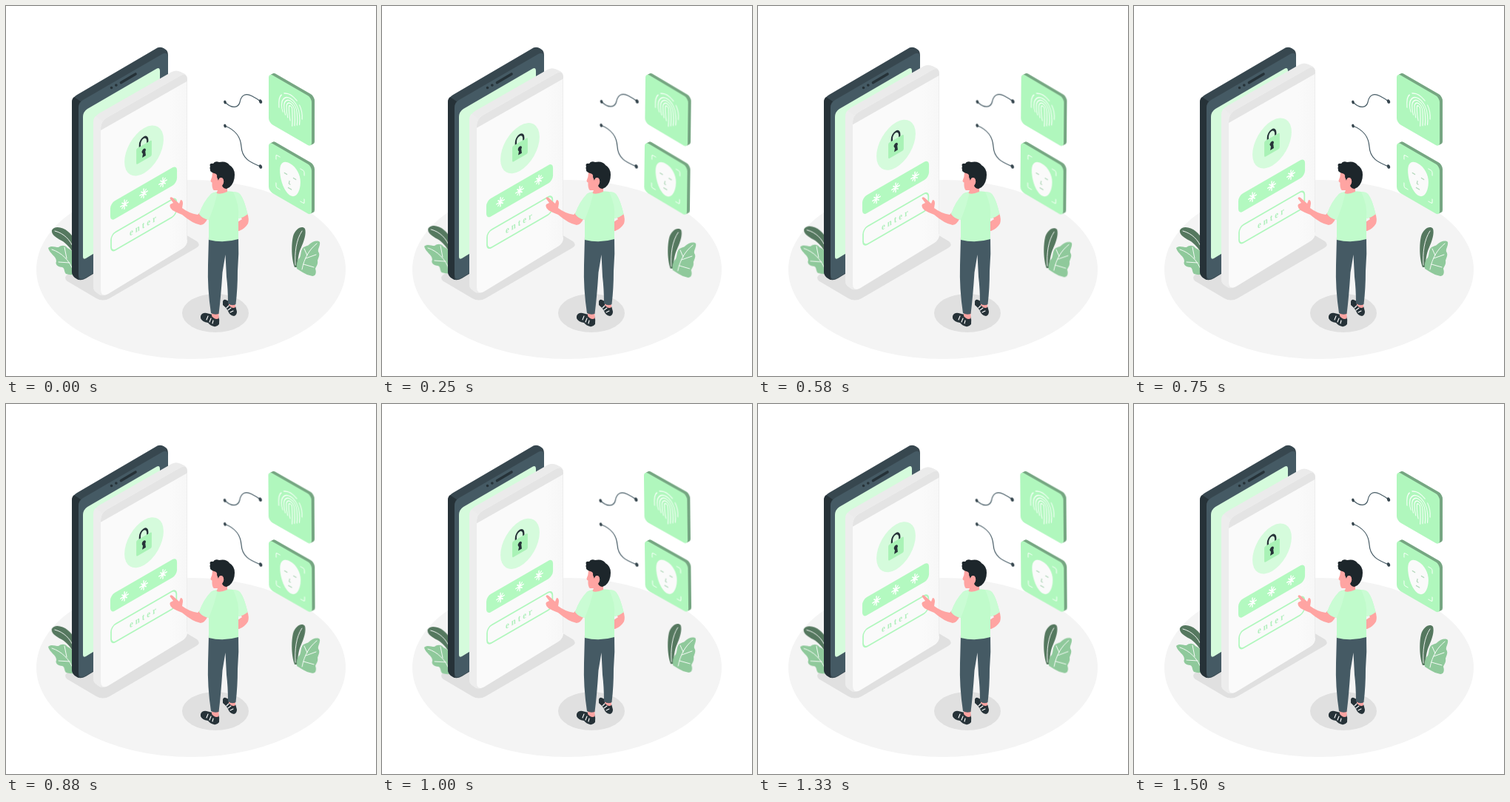
Animation, 500 px wide and 500 px high, one loop 1540 ms. Source, as an HTML page:

```html
<!DOCTYPE html>
<html lang="en">
<head>
<meta charset="utf-8">
<title>Unlock</title>
<style>
  html, body { margin: 0; width: 100%; height: 100%; overflow: hidden; background: #fff; }
  svg { display: block; width: 100vw; height: 100vh; }
  .line { fill: none; stroke-linecap: round; stroke-linejoin: round; }
  #plants { transform-origin: 240px 332px; }
  #cards { transform-origin: 356px 186px; }
</style>
</head>
<body>
<svg viewBox="0 0 500 500">
  <defs>
    <linearGradient id="gloss">
      <stop offset=".8" stop-color="#fafafa"/>
      <stop offset="1" stop-color="#f7f7f7"/>
    </linearGradient>
    <clipPath id="faceClip"><path id="faceShape" d="M128 166Q128 156 136 151L236 94Q245 90 245 100V316Q245 324 238 328L138 389Q128 394 128 383Z"/></clipPath>
    <g id="card">
      <rect width="67" height="67" rx="6" transform="matrix(.866 .5 0 1 4 -2)" fill="#76a682"/>
      <rect width="67" height="67" rx="6" transform="matrix(.866 .5 0 1 2 -1)" fill="#76a682"/>
      <rect width="67" height="67" rx="6" transform="matrix(.866 .5 0 1 0 0)" fill="#b0f7bd"/>
    </g>
  </defs>

  <ellipse cx="250" cy="356" rx="209" ry="121" fill="#f4f4f4"/>
  <path d="M83 363L203 295Q211 291 219 295L258 318Q264 323 257 327L140 395Q131 400 122 395L83 372Q77 367 83 363Z" fill="#e0e0e0"/>
  <ellipse cx="283" cy="415" rx="45" ry="26" fill="#e0e0e0"/>

  <g id="plants">
    <path d="M62 303C65 297 76 298 84 305C91 311 95 318 95 328L92 336C87 327 82 321 75 317C68 313 61 309 62 303Z" fill="#55785f"/>
    <path class="line" d="M66 304C78 307 87 316 91 327" stroke="#fff" stroke-width=".9"/>
    <path d="M57 327C61 323 66 326 71 326C75 323 80 323 83 327C88 329 92 334 94 338V363Q88 364 81 362C78 359 80 355 76 353C70 353 66 349 68 345C68 338 59 335 57 327Z" fill="#8fc99b"/>
    <path class="line" d="M62 329C75 333 86 344 91 358M79 326L82 341M71 346L86 347" stroke="#fff" stroke-width=".9"/>
    <path d="M390 353C386 343 385 324 388 311C391 301 400 296 404 301C406 307 403 317 399 326C395 334 394 345 394 353Z" fill="#55785f"/>
    <path class="line" d="M400 304C392 316 390 333 391 350" stroke="#fff" stroke-width=".9"/>
    <path d="M393 355C392 348 394 343 397 340C399 336 398 331 401 327C404 324 407 325 410 322C414 318 421 316 424 319C425 324 421 328 422 332C425 336 422 340 421 344C422 349 419 352 418 355C420 361 418 365 414 365Q407 364 401 360Z" fill="#8fc99b"/>
    <path class="line" d="M420 321C409 330 403 341 400 356M403 328L407 337M419 336L405 341M416 353L402 349" stroke="#fff" stroke-width=".9"/>
  </g>

  <g id="phone">
    <path d="M89 131Q89 124 96 120L202 58Q207 54 213 57L216 59Q219 61 219 67V300L108 368Q101 372 96 369L93 367Q89 364 89 358Z" fill="#37474f"/>
    <path d="M89 130Q89 125 92 123L101 129Q98 132 98 138V370L93 367Q89 364 89 358Z" fill="#263238"/>
    <path d="M98 138Q98 131 104 127L211 65Q219 61 219 70V300L108 367Q98 373 98 362Z" fill="#455a64"/>
    <path d="M104 150Q104 143 110 139L203 85Q208 82 208 88V280L108 341Q104 343 104 339Z" fill="#d5fbdc"/>
    <g class="line" stroke="#263238" stroke-width="3.600">
      <path d="M155.500 103.500L175 92"/><path d="M142.500 110.500h.1M148.800 107h.1"/>
    </g>
  </g>

  <g id="cards">
    <use href="#card" x="355" y="90.500"/>
    <use href="#card" x="355" y="183"/>
    <g id="print" class="line" stroke="#f4fff6" stroke-width="1.300" transform="matrix(.866 .5 0 1 384.500 142)"></g>
    <g transform="matrix(.866 .5 0 1 384 234)">
      <path d="M0-21C10-21 16-14 16-4C16 9 9 22 0 22C-9 22-16 9-16-4C-16-14-10-21 0-21Z" fill="#fafafa"/>
      <path class="line" d="M-9-4h4M5-4h4M-1 3l-1 4h2M-3 13h5" stroke="#b5d8bd" stroke-width="1.300"/>
      <path class="line" d="M-22-16v-4q0-2 2-2h4M22-16v-4q0-2-2-2h-4M-22 16v4q0 2 2 2h4M22 16v4q0 2-2 2h-4" stroke="#f4fff6" stroke-width="1.200"/>
    </g>
    <g class="line" stroke="#455a64" stroke-width="1.200">
      <path d="M296 130C305 139 314 138 316 130C318 119 325 118 332 121.500Q339 125 344 129"/>
      <path d="M296 162C311 168 317 177 318 190C319 208 333 212 344 217"/>
    </g>
    <g fill="#37474f">
      <ellipse cx="296" cy="130" rx="1.800" ry="2.500" transform="rotate(-20 296 130)"/>
      <ellipse cx="344" cy="129" rx="2" ry="2.900" transform="rotate(-20 344 129)"/>
      <ellipse cx="296" cy="162" rx="1.800" ry="2.500" transform="rotate(-20 296 162)"/>
      <ellipse cx="344" cy="217" rx="2" ry="2.900" transform="rotate(-20 344 217)"/>
    </g>
  </g>

  <g id="panel">
    <path d="M118 158Q118 150 126 145L224 89Q230 86 236 89L242 92Q245 95 245 100V316Q245 323 238 328L138 389Q131 393 126 390L122 387Q118 384 118 380Z" fill="#ebebeb"/>
    <path d="M118 158Q118 152 121 149L131 156Q128 160 128 166V391L122 387Q118 384 118 380Z" fill="#ededed"/>
    <use href="#faceShape" fill="url(#gloss)"/>
    <path d="M128 90H246V101L128 168Z" fill="#e4e4e4" clip-path="url(#faceClip)"/>
    <path d="M244.500 102V316" stroke="#ededed"/>

    <g transform="matrix(.866 -.5 0 1 186.500 195.500)">
      <circle r="30.500" fill="#d5fbdc"/>
      <path class="line" d="M-6.500-7V-11.500A6 6.500 0 0 1 5.500-11.500V-9" stroke="#263238" stroke-width="2.600"/>
      <rect x="-12" y="-8.500" width="24" height="21.500" rx="2" fill="#a9f2b6"/>
      <path d="M-3 1.500A3 2.900 0 1 1 2 2L2.800 8H-2.800L-1.700 3.500Z" fill="#263238"/>
    </g>
    <g transform="matrix(.866 -.5 0 1 141 266.800)">
      <rect width="104" height="24.500" rx="7" fill="#b3f9c0"/>
      <g id="stars" class="line" stroke="#fff" stroke-width="1.600"></g>
    </g>
    <g transform="matrix(.866 -.5 0 1 142 309)">
      <rect width="102" height="24" rx="7" fill="none" stroke="#b0f7bd" stroke-width="2"/>
      <text x="29" y="16.500" fill="#b0efbc" font-family="'Liberation Serif', serif" font-weight="700" font-size="12.500" letter-spacing="3.400">enter</text>
    </g>
  </g>

  <g id="man">
    <path d="M293 399Q294 396 297 397L309 403Q311 408 312 413Q312 418 308 419Q302 418 300 412Q297 407 293 404Z" fill="#263238"/>
    <path d="M301 397H310V407Q306 410 301 404Z" fill="#ffa4a2"/>
    <path d="M263 419Q265 414 271 415L287 419Q289 424 288 430Q285 434 281 433Q276 432 273 428Q265 427 263 422Z" fill="#263238"/>
    <path d="M278 412H287.500V422Q283 425 278 419Z" fill="#ffa4a2"/>
    <path class="line" d="M271 424l2-5M275 427l2-5M279 429l1-4M298 408l3-3M300 411l4-3M303 414l4-2" stroke="#fff" stroke-width="1.100"/>
    <path d="M274 312H314Q315 335 313 358Q313 382 310.500 403Q306 406 300 402Q300 382 298 366L296.500 336L292.500 360Q290.500 392 287.500 416Q282 418 277 415Q272 382 273 350Z" fill="#455a64"/>

    <path d="M314 280L326 280Q329 288 327 294Q323 301 315 304L313 304V292L319 288Z" fill="#ffa4a2"/>
    <path d="M263 278L272 288Q269 295 263 296Q252 294 238 282Q230 279 225 276Q220 272 222 268L226 266L221.500 260Q222 257 225 259L234 267L236 262Q239 262 239 267L238 273Q247 280 259 282Z" fill="#ffa4a2"/>

    <path d="M277 254C284 249 309 249 316 254C321 260 324 271 326.500 281Q321 286 314 287V315Q294 321 274 316V289Q265 287 261 281Q267 264 277 254Z" fill="#c0fbcb"/>
    <path d="M277 254Q283 251 286 251Q282 270 274 289Q265 287 261 281Q267 264 277 254Z" fill="#cafcd4"/>
    <path d="M307 251Q314 251 316 254C321 260 324 271 326.500 281Q321 286 314 287Q316 270 307 251Z" fill="#cafcd4"/>

    <path d="M279 225Q279 231 276.500 236Q276.500 238 278.500 238.500Q278 247 281 249H286L284.500 253Q290 255 299 251V235L294 224Z" fill="#ffa4a2"/>
    <path d="M276 217Q274 212 280 213Q282 209 288 211Q298 209 302 215Q309 219 309 228Q309 239 302 245L298 247Q294 247 292 243Q296 238 293 233Q289 230 287 236L285 231Q286 227 281 226Q275 224 276 221Q275 219 276 217Z" fill="#1d262b"/>
    <ellipse cx="290.500" cy="236.500" rx="3.200" ry="4.500" fill="#ffa4a2"/>
  </g>
</svg>
<script>
  const LOOP = 1540, CYCLE = 1500;
  const byId = id => document.getElementById(id);

  function addPath(parent, d) {
    const path = document.createElementNS('http://www.w3.org/2000/svg', 'path');
    path.setAttribute('d', d);
    parent.append(path);
  }

  // Asterisks along the password field
  for (let i = 0; i < 3; i++) {
    const cx = 22 + 30 * i, cy = 12.3;
    let d = '';
    for (let k = 0; k < 4; k++) {
      const a = Math.PI * k / 4 + Math.PI / 2;
      const r = k % 2 ? 5.2 : 6;
      const x = r * Math.cos(a), y = r * Math.sin(a);
      d += `M${cx - x} ${cy - y}L${cx + x} ${cy + y}`;
    }
    addPath(byId('stars'), d);
  }

  // Fingerprint ridges: nested arches whose legs lean with the finger
  for (let i = 0; i < 4; i++) {
    const r = 2.5 + 3.8 * i, top = -4 + i;
    const left = 13 - i * 2, right = 19 - i * 2.5;
    addPath(byId('print'),
      `M${2 - r} ${left}Q${-r} ${left / 2} ${-r} ${top}A${r} ${r * 1.15} 0 0 1 ${r} ${top}Q${r + 1} ${right / 2} ${r} ${right}`);
  }
  addPath(byId('print'), 'M-18 4Q-19-10-14-15M-10-19Q0-25 10-19M14-15Q19-9 18 2');

  // Each step is [fraction of the cycle, transform]
  function loop(id, steps) {
    const frames = steps.map(([at, transform]) => ({ offset: at * CYCLE / LOOP, transform }));
    frames.push({ offset: 1, transform: steps[0][1] });
    byId(id).animate(frames, { duration: LOOP, iterations: Infinity, easing: 'linear' });
  }

  const sway = [[0, 'rotate(0deg)'], [.25, 'rotate(1deg)'], [.75, 'rotate(-1deg)'], [1, 'rotate(0deg)']];
  loop('panel', [[0, 'translateY(0px)'], [.5, 'translateY(-10px)'], [1, 'translateY(0px)']]);
  loop('plants', sway);
  loop('cards', sway);
</script>
</body>
</html>
```
